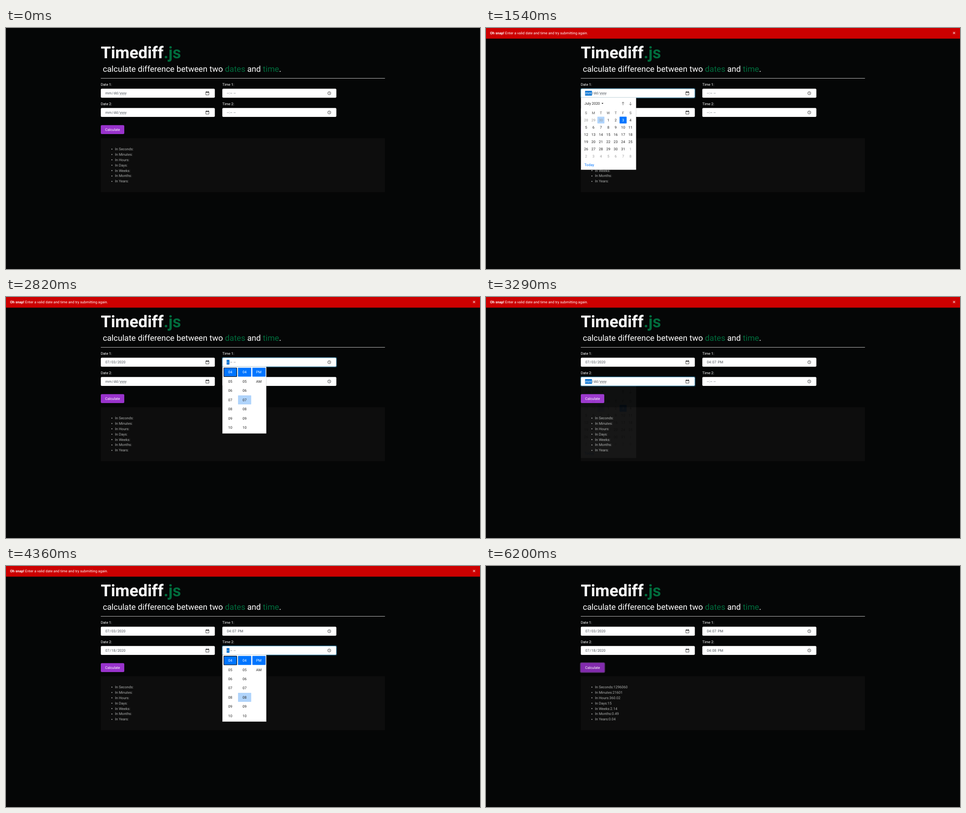
An HTML page for the animation above (6.22 s loop, 1050x534 px).

```html
<!DOCTYPE html>
<html lang="en">
<head>
<meta charset="utf-8">
<title>Timediff.js</title>
<style>
html, body { margin: 0; width: 100%; height: 100%; overflow: hidden; background: #050606; }
svg { display: block; width: 100%; height: 100%; }
text { font: 7.96px Roboto, sans-serif; white-space: pre; text-rendering: geometricPrecision; }
</style>
</head>
<body>
<svg id="stage" viewBox="0 0 1050 534"></svg>
<script>
const LOOP = 6220;
const GREEN = '#006b3c', INK = '#495057', BLUE = '#0075ff', HOVER = '#b0d4fb';
const UNITS = ['Seconds', 'Minutes', 'Hours', 'Days', 'Weeks', 'Months', 'Years'];
const RESULTS = ['1296060', '21601', '360.02', '15', '2.14', '0.49', '0.04'];
const LEFT = 210, RIGHT = 479.2, ROW = 42.6;

// Moments of the user's actions
const T = { press: 360, date1: 1290, pick1: 1730, time1: 2140, open1: 2530, set1: 2900,
            date2: 3070, open2: 3289, pick2: 3560, time2: 3930, open3: 4180, set2: 4490, submit: 4740 };

const ramp = (t, a, b) => Math.max(0, Math.min(1, (t - a) / (b - a)));
const pulse = (t, a, b, len) => ramp(t, a, a + len) - ramp(t, b, b + len);
const within = (t, a, b) => t >= a && t < b;
const pad = n => String(n).padStart(2, '0');

const rect = (x, y, w, h, fill, more = '') =>
  `<rect x="${x}" y="${y}" width="${w}" height="${h}" fill="${fill}" ${more}/>`;
const text = (x, y, s, fill, more = '') => `<text x="${x}" y="${y}" fill="${fill}" ${more}>${s}</text>`;
const group = (opacity, s) => opacity > 0 ? `<g opacity="${opacity}">${s}</g>` : '';
const sized = (px, weight = 400) => `style="font-size:${px}px;font-weight:${weight}"`;
const green = s => `<tspan fill="${GREEN}">${s}</tspan>`;
const MEDIUM = 'font-weight="500"', BOLD = 'font-weight="700"', MIDDLE = 'text-anchor="middle"';

const calendarIcon = `<path d="M3 6V22H21V6" fill="none" stroke="#111" stroke-width="2"/>
  <path d="M2 8V4.5Q2 3 3.5 3H5V1h2v2h10V1h2v2h1.5Q22 3 22 4.5V8z" fill="#111"/>`;
const clockIcon = `<circle cx="12" cy="12" r="9" fill="none" stroke="#111" stroke-width="2"/>
  <path d="M12 7v5.5l4 2.5" fill="none" stroke="#111" stroke-width="1.8"/>`;

function field(x, dy, label, value, ring, selected) {
  const y = 134.6 + dy, isTime = x === RIGHT;
  const parts = value.split(/([\/: ])/).map((p, i) =>
    `<tspan dx="${i ? .57 : 0}" ${selected && !i ? 'fill="#fff"' : ''}>${p}</tspan>`).join('');
  const selWidth = { mm: 15.2, '--': 6.2 }[value.slice(0, 2)] || 10.1;
  return text(x, 127.9 + dy, label, '#fff', MEDIUM)
    + group(ring, rect(x - 1.8, y - 1.8, 256.2, 23.4, '#0f2c3a', 'rx="3.6"'))
    + rect(x, y, 252.6, 19.8, '#fff', 'rx="2.2"')
    + group(ring, rect(x + .3, y + .3, 252, 19.2, 'none', 'rx="2" stroke="#65b5dc" stroke-width=".7"'))
    + (selected ? rect(x + 9.5, 139.2 + dy, selWidth, 10.6, '#0b76d4') : '')
    + text(x + 10.1, 147.3 + dy, parts, INK)
    + `<g transform="translate(${isTime ? 711.6 : 441.6} ${140 + dy}) scale(.375)">${isTime ? clockIcon : calendarIcon}</g>`;
}

function datePopup(dy, opacity, hover) {
  const cell = 16.4, x0 = 213.5, top = 154 + dy;
  let s = rect(210.3, top, 122, 160, '#fff', 'stroke="#bbb" stroke-width=".5"')
    + text(218, top + 16, 'July 2020', '#222', MEDIUM)
    + `<path d="M256 ${top + 12}h4l-2 2.4z" fill="#222"/>
       <path d="M303.5 ${top + 17}v-7m-2.6 2.6l2.6-2.6l2.6 2.6M320 ${top + 10}v7m-2.6-2.6l2.6 2.6l2.6-2.6"
       fill="none" stroke="#444" stroke-width=".8"/>`;
  [...'SMTWTFS'].forEach((d, i) => s += text(x0 + (i + .5) * cell, top + 37, d, '#555', MIDDLE));
  for (let i = 0; i < 42; i++) {
    const n = i - 2, today = n === 3, x = x0 + i % 7 * cell, y = top + 42 + Math.floor(i / 7) * 16;
    const day = n < 1 ? n + 30 : n > 31 ? n - 31 : n;
    const fill = today ? BLUE : n === hover ? HOVER : '';
    if (fill) s += rect(x + .4, y + .4, cell - .8, 15.2, fill, 'rx="1"');
    s += text(x + cell / 2, y + 10.8, day, today ? '#fff' : day === n ? '#222' : '#999', MIDDLE);
  }
  return group(opacity, s + text(218, top + 152, 'Today', BLUE));
}

function timePopup(dy, opacity, hover, minute, scroll) {
  const pitch = 20.45, top = 156.4 + dy;
  let s = rect(479.5, 154.2 + dy, 97, 148, '#fff', 'stroke="#bbb" stroke-width=".5"');
  const column = (i, labels, chosen, shift, focused) => {
    const x = 482 + i * 31.7;
    let cells = '';
    labels.forEach((label, n) => {
      const y = (n - shift) * pitch, on = n === chosen;
      const fill = on ? BLUE : i === 1 && +label === hover ? HOVER : '';
      if (fill) cells += rect(.2, y + .2, 29.4, 20, fill, 'rx="1"');
      if (on && focused) cells += rect(.5, y + .6, 28.8, 19.4, 'none', 'rx="1" stroke="#111" stroke-width="1.2"');
      cells += text(14.7, y + 13.1, label, on ? '#fff' : '#222', MIDDLE + (on ? ' ' + BOLD : ''));
    });
    s += `<svg x="${x}" y="${top}" width="30" height="143.2">${cells}</svg>`;
  };
  const numbers = count => Array.from({ length: count }, (_, n) => pad(n + 4));
  column(0, numbers(7), 0, 0, minute === 4);
  column(1, numbers(13), minute - 4, scroll, minute !== 4);
  column(2, ['PM', 'AM'], 0, 0, false);
  return group(opacity, s);
}

function page(t) {
  const done = t >= T.submit;
  let s = rect(0, 0, 1050, 534, '#050606')
    + text(LEFT, 67.2, 'Timediff' + green('.js'), '#fff', sized(36.27, 700))
    + text(214.5, 97.4, `calculate difference between two ${green('dates')} and ${green('time')}.`, '#fff', sized(18.13))
    + rect(LEFT, 111, 629.5, .9, '#d0d0d0')
    + rect(LEFT, 244.2, 629.5, 119.6, '#0d0d0d');
  UNITS.forEach((unit, i) => {
    const y = 268.2 + i * 11.9;
    s += `<circle cx="234.6" cy="${y + .2}" r="1.15" fill="#adafae"/>`
      + text(241.4, y + 2.7, `In ${unit}:${done ? RESULTS[i] : ''}`, '#adafae');
  });
  return s;
}

function button(t) {
  const dark = pulse(t, T.press, T.date1, 80) + ramp(t, T.submit, T.submit + 80);
  const ring = ramp(t, 500, 630) - ramp(t, T.date1, T.date1 + 80) + ramp(t, T.submit, T.submit + 140);
  return group(ring, rect(208.2, 213.4, 55.6, 23.4, '#572c6d', 'rx="3.6"'))
    + rect(LEFT, 215.2, 52, 19.8, '#9933cc', 'rx="2.2"')
    + group(dark, rect(LEFT, 215.2, 52, 19.8, '#822bad', 'rx="2.2"'))
    + text(219.5, 227.8, 'Calculate', '#fff', MEDIUM);
}

function alertBar(t) {
  const opacity = ramp(t, 480, 630) - ramp(t, T.submit, T.submit + 140);
  return group(opacity, rect(0, 0, 1050, 23.6, '#cc0000')
    + text(9, 13.7, `<tspan ${BOLD}>Oh snap!</tspan> Enter a valid date and time and try submitting again.`, '#fff')
    + text(1037, 15.4, '×', '#fff', MIDDLE + ' opacity=".65" ' + sized(11.9, 700)));
}

function fields(t) {
  const make = (x, dy, label, from, to, setAt, empty, value) => field(x, dy, label,
    t >= setAt ? value : empty, pulse(t, from, to, 70), within(t, from, to));
  return make(LEFT, 0, 'Date 1:', T.date1, T.time1, T.pick1, 'mm/dd/yyyy', '07/03/2020')
    + make(RIGHT, 0, 'Time 1:', T.time1, T.date2, T.set1, '--:-- --', '04:07 PM')
    + make(LEFT, ROW, 'Date 2:', T.date2, T.time2, T.pick2, 'mm/dd/yyyy', '07/18/2020')
    + make(RIGHT, ROW, 'Time 2:', T.time2, T.submit, T.set2, '--:-- --', '04:08 PM');
}

function popups(t) {
  // The pointer runs down the minute column until it reaches the chosen value
  const minutePopup = (dy, open, close, hoverAt, setAt, value) => {
    const set = t >= setAt;
    const hover = t < hoverAt ? 0 : Math.min(value, 5 + Math.floor((t - hoverAt) / 30));
    return timePopup(dy, pulse(t, open, close, 25), set ? 0 : hover, set ? value : 4,
      (value - 4) * ramp(t, setAt, setAt + 45));
  };
  return datePopup(0, ramp(t, T.date1 + 5, T.date1 + 75) - ramp(t, T.pick1 - 15, T.pick1 + 25),
      within(t, 1350, 1520) ? 4 : 0)
    + datePopup(ROW, ramp(t, T.open2, T.open2 + 50) - ramp(t, T.pick2 - 5, T.pick2 + 30), t >= 3400 ? 18 : 0)
    + minutePopup(0, T.open1, T.date2, 2750, T.set1, 7)
    + minutePopup(ROW, T.open3, T.submit, 4230, T.set2, 8);
}

const stage = document.getElementById('stage');
function draw(now) {
  const t = now % LOOP;
  stage.innerHTML = page(t) + fields(t) + button(t) + alertBar(t) + popups(t);
}
function tick() {
  draw(performance.now());
  requestAnimationFrame(tick);
}
tick();
</script>
</body>
</html>
```
